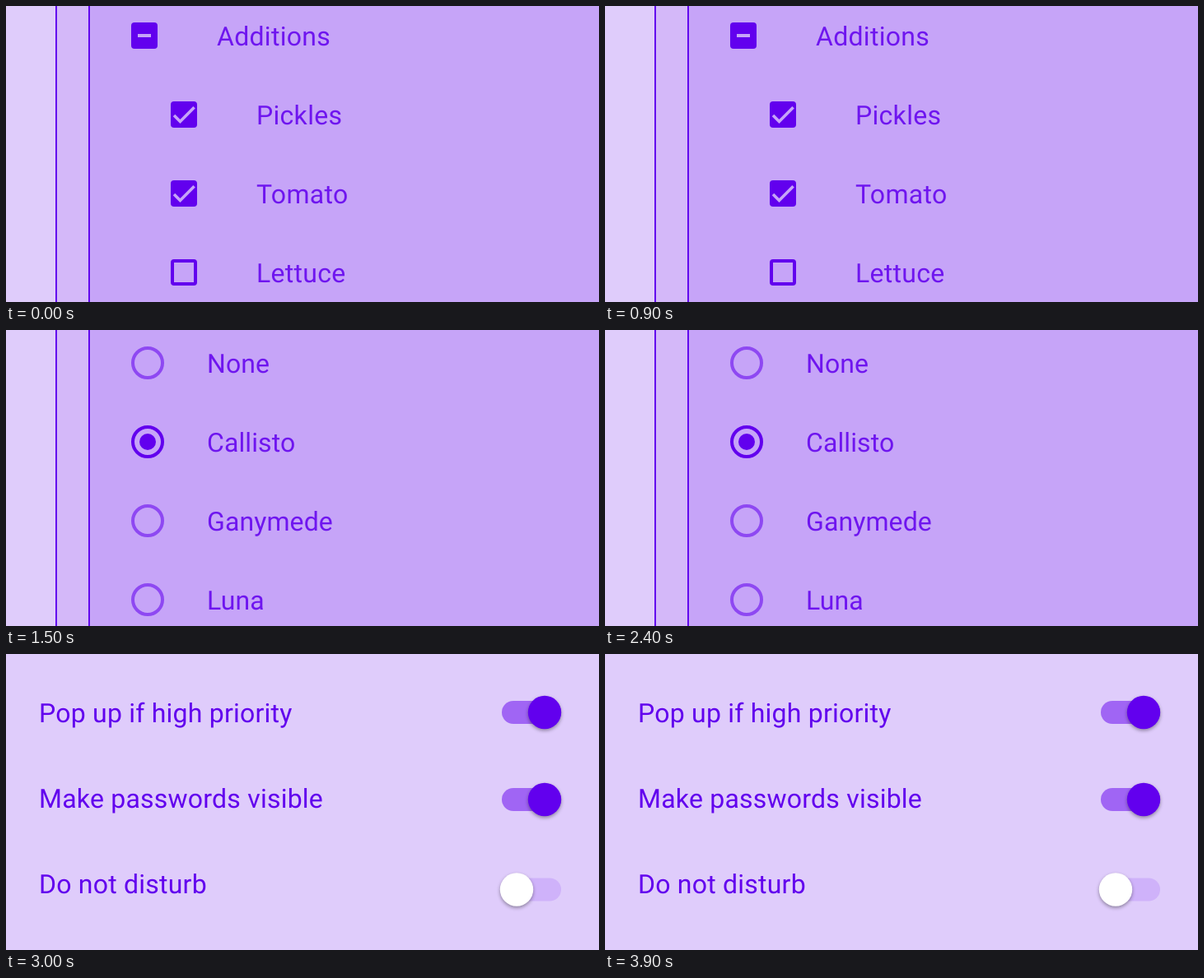
These frames come from a looping animation (720 px wide and 360 px high, 4.5 s). An HTML page:

```html
<!DOCTYPE html>
<html lang="en">
<head>
<meta charset="utf-8">
<title>Selection controls</title>
<style>
  html, body { margin: 0; height: 100%; overflow: hidden; background: #dfccfb; }
  svg { display: block; width: 720px; height: 360px; }
  text { font: 32px Roboto, sans-serif; fill: #6200ee; text-rendering: geometricPrecision; }
  .panel text { fill-opacity: .87; }
  .solid { fill: #6200ee; }
  .ring { fill: none; stroke: #6200ee; stroke-width: 4; }
  .mark { fill: none; stroke: #c6a4f8; stroke-width: 3.6; }
  .knob { filter: drop-shadow(0 2px 2px rgba(0, 0, 0, .36)); }
</style>
</head>
<body>
<svg viewBox="0 0 720 360">
  <g id="panel">
    <rect x="60" width="42" height="360" fill="#d4b8f9"/>
    <rect x="102" width="618" height="360" fill="#c6a4f8"/>
    <path class="solid" d="M60 0h2v360h-2zM100 0h2v360h-2z"/>
  </g>
  <g class="scene panel" id="checks" letter-spacing=".3"></g>
  <g class="scene panel" id="radios" letter-spacing=".1"></g>
  <g class="scene" id="switches" letter-spacing=".22"></g>
</svg>
<script>
const SCENE_MS = 1500;
const byId = id => document.getElementById(id);
const label = (x, y, text) => `<text x="${x}" y="${y}">${text}</text>`;

function checkbox(x, y, state, text) {
  const marks = {
    mixed: `<path class="mark" style="stroke-width:4" d="M${x + 8} ${y + 16}h16"/>`,
    on: `<path class="mark" d="M${x + 4} ${y + 17}l7.45 7.45 17.1 -17.1"/>`
  };
  const box = state === 'off'
    ? `<rect class="ring" x="${x + 2}" y="${y + 2}" width="28" height="28" rx="2"/>`
    : `<rect class="solid" x="${x}" y="${y}" width="32" height="32" rx="4"/>${marks[state]}`;
  return box + label(x + 104, y + 28, text);
}

function radio(y, on, text) {
  return `<circle class="ring" cx="172" cy="${y}" r="18" stroke-opacity="${on ? 1 : .56}"/>` +
    (on ? `<circle class="solid" cx="172" cy="${y}" r="10"/>` : '') +
    label(244, y + 12, text);
}

function toggle(y, on, baseline, text) {
  return `<rect class="solid" x="602" y="${y - 14}" width="72" height="28" rx="14" fill-opacity="${on ? .5 : .13}"/>
    <circle class="knob" cx="${on ? 654 : 620}" cy="${y}" r="20.2" fill="${on ? '#6200ee' : '#fff'}"/>` +
    label(40, baseline, text);
}

byId('checks').innerHTML =
  checkbox(152, 20, 'mixed', 'Additions') +
  checkbox(200, 116, 'on', 'Pickles') +
  checkbox(200, 212, 'on', 'Tomato') +
  checkbox(200, 308, 'off', 'Lettuce');

byId('radios').innerHTML = ['None', 'Callisto', 'Ganymede', 'Luna']
  .map((text, i) => radio(40 + 96 * i, i === 1, text)).join('');

byId('switches').innerHTML =
  toggle(71, true, 83, 'Pop up if high priority') +
  toggle(177, true, 187, 'Make passwords visible') +
  toggle(286.5, false, 291, 'Do not disturb');

const scenes = [...document.querySelectorAll('.scene')];
const show = (el, visible) => { el.style.display = visible ? '' : 'none'; };
const start = performance.now();

function draw(now) {
  const current = Math.floor(Math.max(0, now - start) / SCENE_MS) % scenes.length;
  scenes.forEach((scene, i) => show(scene, i === current));
  show(byId('panel'), current < 2);
  requestAnimationFrame(draw);
}
draw(start);
</script>
</body>
</html>
```
